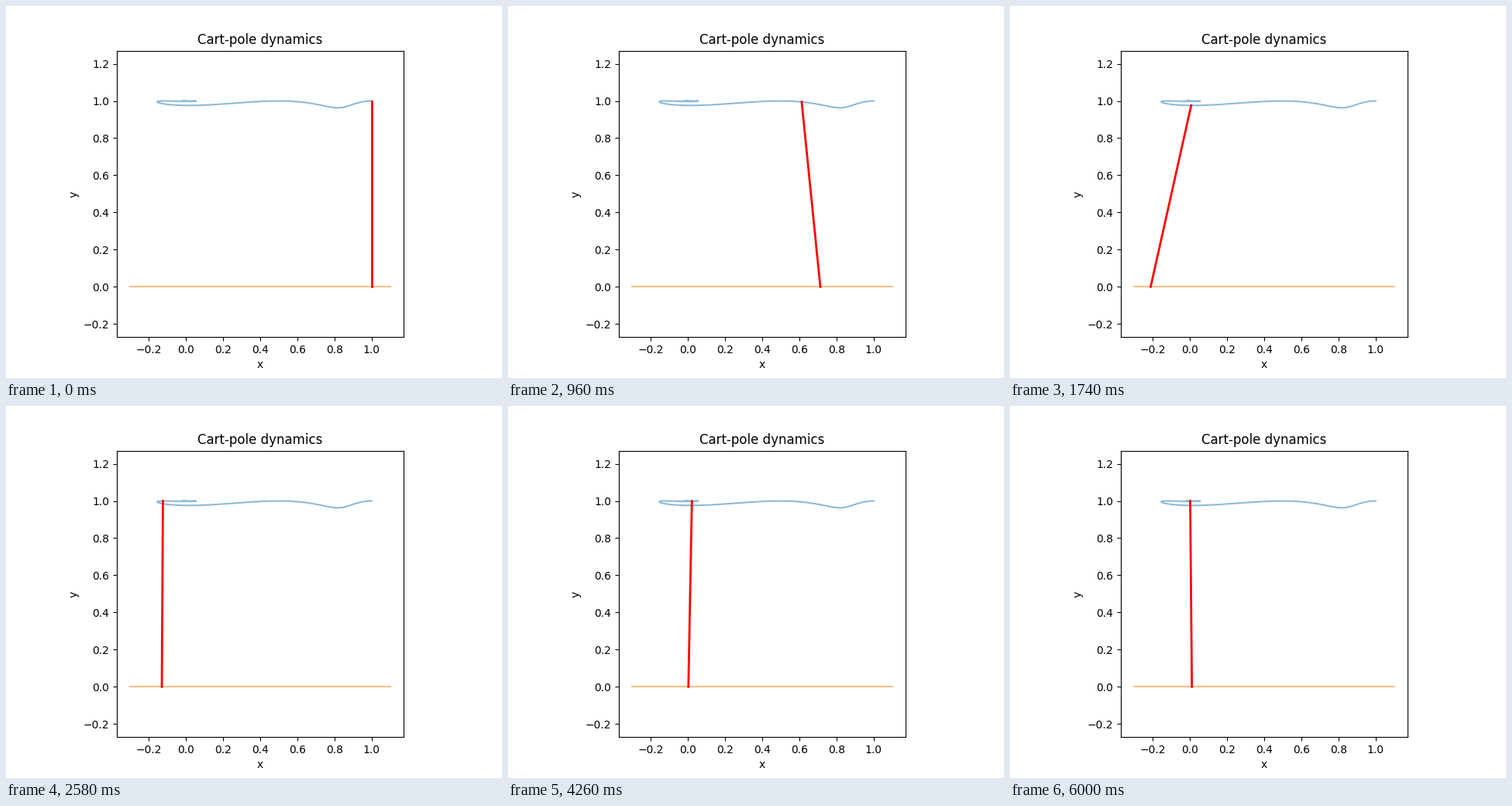
A matplotlib script that plays this animation: 640x480 px, repeating every 6030 ms.

```python
import numpy as np
import matplotlib.pyplot as plt
from matplotlib.animation import FuncAnimation

FRAMES = 201
INTERVAL = 30

# Closed-loop poles per frame: a damped swing and a double real pole
DECAY, SWING, FAST = 0.0222, 0.0672, 0.105


def settle(t, amp, phase, start):
    """Damped swing plus a fast term that makes it start at rest."""
    wave = amp * np.exp(-DECAY * t) * np.cos(SWING * t - phase)
    speed = amp * (SWING * np.sin(phase) - DECAY * np.cos(phase))
    a = start - amp * np.cos(phase)
    b = FAST * a - speed
    return wave + (a + b * t) * np.exp(-FAST * t)


steps = np.arange(FRAMES)
cart = settle(steps, 1.415, 1.735, 1)
lean = settle(steps, -0.80, 1.11, 0)  # sine of the pole angle
tip_x = cart + lean
tip_y = np.sqrt(1 - lean ** 2)

track = np.array([-0.3007, 1.1007])
half = 0.55 * np.ptp(track)

fig, ax = plt.subplots(figsize=(6.4, 4.8), dpi=100)
ax.set_aspect("equal")
ax.set_xlim(track.mean() - half, track.mean() + half)
ax.set_ylim(0.5 - half, 0.5 + half)
ax.set_xticks(np.arange(-1, 6) * 0.2)
ax.set_yticks(np.arange(-1, 7) * 0.2)
ax.set_title("Cart-pole dynamics")
ax.set_xlabel("x")
ax.set_ylabel("y")

ax.plot(tip_x, tip_y, color="C0", alpha=0.5)
ax.plot(track, [0, 0], color="C1", alpha=0.5)
pole, = ax.plot([], [], color="red", lw=2)


def update(i):
    pole.set_data([cart[i], tip_x[i]], [0, tip_y[i]])
    return pole,


anim = FuncAnimation(fig, update, frames=FRAMES, interval=INTERVAL,
                     repeat=True, repeat_delay=0)
plt.show()
```
